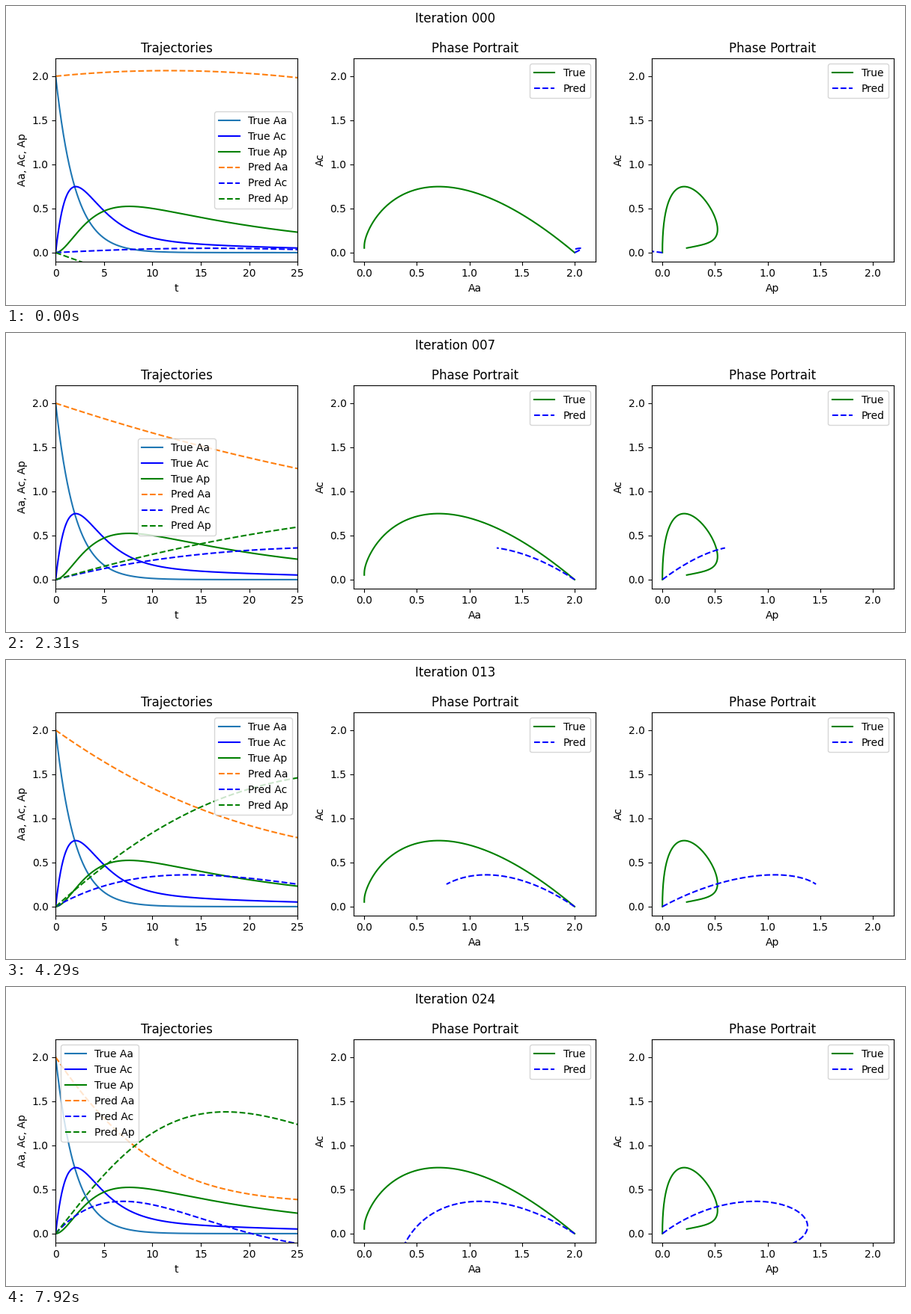
A matplotlib script that plays this animation: 1200 px wide and 400 px high, repeating every 8 s.

```python
import numpy as np
import matplotlib.pyplot as plt
from matplotlib.animation import FuncAnimation

LOOP, TICK, HOLD = 8000, 50, 330  # ms
START = [2, 0, 0]
t = np.linspace(0, 25, 1000)

# Absorption rate, elimination, and exchange between the compartments
KA, KE, K12, K21 = 0.5, 0.3, 0.2, 0.1
TRUE_RATES = [[-KA, 0, 0],
              [KA, -KE - K12, K21],
              [0, K12, -K21]]

# How strongly Aa drives Aa, Ac and Ap as training goes on
STEPS = [0, 5, 9, 13, 17, 21, 24]
FROM_AA = [
    [0.0055, -0.0104, -0.0260, -0.0387, -0.0514, -0.0678, -0.0806],
    [0.0030, 0.0086, 0.0199, 0.0314, 0.0431, 0.0535, 0.0620],
    [-0.0200, 0.0032, 0.0286, 0.0488, 0.0639, 0.0699, 0.0690],
]


def solve(rates):
    """Follow x' = rates @ x from START; rows are Aa, Ac, Ap."""
    lam, vec = np.linalg.eig(np.asarray(rates, float))
    weights = np.linalg.solve(vec, START)
    return ((vec * weights) @ np.exp(np.outer(lam, t))).real


def learned_rates(k):
    """Rate matrix of the fitted linear model after k iterations."""
    from_aa = [np.interp(k, STEPS, row) for row in FROM_AA]
    fade = 0.022 * np.exp(-k / 2)
    from_ac = [0.004 - 0.0024 * k, 0.01 - 0.004 * k, 0.0075 * (k - 4)]
    from_ap = [0.004 + 0.0004 * k + fade,
               -0.011 - 0.000053 * k ** 2 + fade,
               -0.015 - 0.0008 * k]
    return np.column_stack([from_aa, from_ac, from_ap])


def legend_spot(k):
    if k < 5:
        return "center right"
    if k < 8:
        return "center"
    return "upper right" if k < 24 else "upper left"


fig, (ax_t, ax_a, ax_p) = plt.subplots(1, 3, figsize=(12, 4), dpi=100)
title = fig.suptitle("Iteration 000")
aa, ac, ap = solve(TRUE_RATES)

ax_t.set(title="Trajectories", xlabel="t", ylabel="Aa, Ac, Ap",
         xlim=(0, 25), ylim=(-0.1, 2.2))
for y, color, name in ((aa, "C0", "Aa"), (ac, "b", "Ac"), (ap, "g", "Ap")):
    ax_t.plot(t, y, color=color, label=f"True {name}")
time_lines = [ax_t.plot(t, 0 * t, "--", color=color, label=f"Pred {name}")[0]
              for color, name in (("C1", "Aa"), ("b", "Ac"), ("g", "Ap"))]
legend = ax_t.legend(loc="center right")


def phase_plot(ax, x, name):
    ax.set(title="Phase Portrait", xlabel=name, ylabel="Ac",
           xlim=(-0.1, 2.2), ylim=(-0.1, 2.2))
    ax.plot(x, ac, "g-", label="True")
    line, = ax.plot([], [], "b--", label="Pred")
    ax.legend(loc="upper right")
    return line


phase_a = phase_plot(ax_a, aa, "Aa")
phase_p = phase_plot(ax_p, ap, "Ap")
fig.tight_layout()


def update(frame):
    k = (frame * TICK + TICK - 10) // HOLD  # never later than the true switch
    preds = solve(learned_rates(k))
    for line, y in zip(time_lines, preds):
        line.set_ydata(y)
    phase_a.set_data(preds[0], preds[1])
    phase_p.set_data(preds[2], preds[1])
    legend.set_loc(legend_spot(k))
    title.set_text(f"Iteration {k:03d}")
    return [*time_lines, phase_a, phase_p, legend, title]


anim = FuncAnimation(fig, update, frames=LOOP // TICK, interval=TICK,
                     init_func=lambda: update(0), repeat=True, repeat_delay=0)
plt.show()
```
